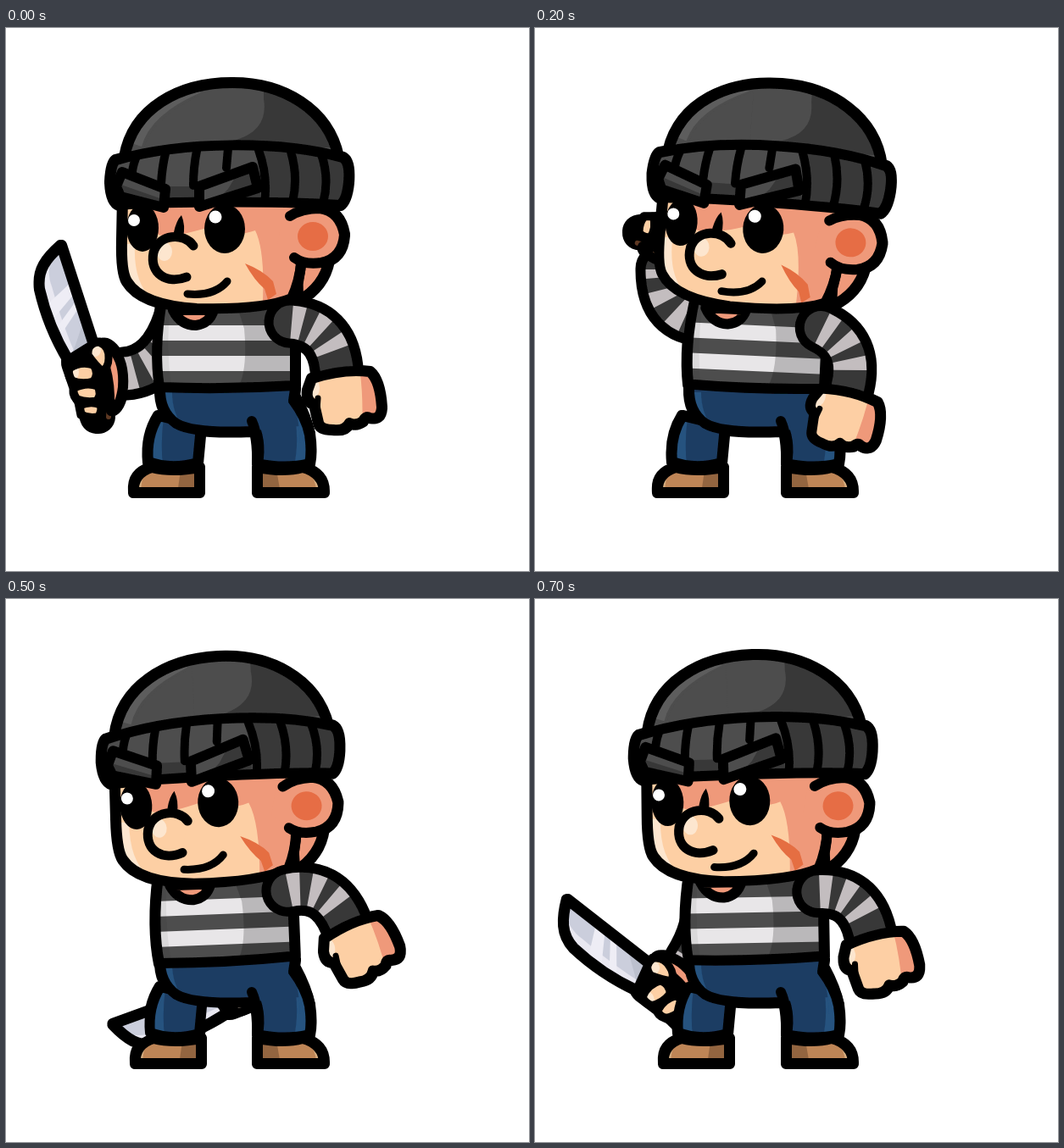
These frames come from a looping animation (617 by 641 pixels, 0.8 s). An HTML page:

```html
<!DOCTYPE html>
<html>
<head>
<meta charset="utf-8">
<style>
html, body { margin: 0; width: 100%; height: 100%; overflow: hidden; background: #fff; }
svg { display: block; }
</style>
</head>
<body>
<svg id="stage" width="617" height="641" viewBox="0 0 617 641" stroke-linecap="round" stroke-linejoin="round"></svg>
<script>
const stage = document.getElementById('stage');
const SKIN = '#fdcfa4', BLUSH = '#ef997a', PALE = '#fde6cf';
const GREY = '#4d4d4d', DARK = '#383838', LIGHT = '#c3bdbf';
let clips = 0;

const fill = (d, color) => `<path d="${d}" fill="${color}"/>`;
const line = (d, width = 10, color = '#000') =>
  `<path d="${d}" fill="none" stroke="${color}" stroke-width="${width}"/>`;
const oval = (x, y, rx, ry, color) =>
  `<ellipse cx="${x}" cy="${y}" rx="${rx}" ry="${ry}" fill="${color}"/>`;
const group = (id, content) => `<g id="${id}">${content}</g>`;

// Outlined shape whose shading is clipped to its own edge
function part(d, color, shading = '', width = 12) {
  const id = 'clip' + clips++;
  return `<clipPath id="${id}"><path d="${d}"/></clipPath>` + fill(d, color) +
    `<g clip-path="url(#${id})">${shading}</g>` + line(d, width);
}

const sleeve = (name, d, dash) =>
  `<path class="${name}" d="${d}" fill="none" stroke="#000" stroke-width="61"/>
   <path class="${name}" d="${d}" fill="none" stroke="${DARK}" stroke-width="39"/>
   <path class="${name}" d="${d}" fill="none" stroke="${LIGHT}" stroke-width="39"
     stroke-linecap="butt" stroke-dasharray="${dash}"/>`;

// Thin black rim around the whole silhouette
const rim = `<filter id="rim" x="0" y="0" width="617" height="641" filterUnits="userSpaceOnUse">
  <feMorphology in="SourceAlpha" operator="dilate" radius="1"/>
  <feMerge><feMergeNode/><feMergeNode in="SourceGraphic"/></feMerge></filter>`;

const knife =
  line('M86 394 L108 458', 40) +
  line('M122 446 L121 459', 6, '#5d3822') +
  part('M65 257 C48 272 37 286 40 308 Q50 352 74 392 L103 374 Z', '#cbcedc',
    fill('M58 255 Q46 285 54 305 Q66 350 84 390 L65 392 L34 310 Z', '#e9e8f1') +
    fill('M48 327 L78 299 L82 312 L56 343 Z M61 352 L85 319 L88 327 L66 360 Z', '#eeedf5') +
    fill('M90 350 L100 362 L108 380 L74 394 L82 374 Z', '#bcc0ce')) +
  part('M101 386 Q112 363 126 379 Q140 394 138 424 Q135 448 124 452 L117 405 Z', BLUSH) +
  part('M75 402 Q88 393 103 398 Q110 408 103 417 Q89 421 78 416 Q73 408 75 402 Z', SKIN,
    oval(79, 406, 7, 10, PALE), 9) +
  part('M81 425 Q95 418 108 423 Q113 432 107 440 Q94 442 84 438 Q78 430 81 425 Z', SKIN, '', 9) +
  part('M87 446 Q100 440 111 445 Q114 453 108 459 Q97 461 89 456 Z', SKIN, '', 9) +
  part('M97 386 Q96 372 110 371 Q122 376 121 390 Q121 400 114 405 Q106 399 97 386 Z', SKIN,
    oval(105, 380, 7, 8, PALE), 9) +
  line('M119 398 Q126 424 124 444', 7);

const leftLeg =
  part('M180 458 Q165 482 168 512 Q195 522 226 513 L230 470 Z', '#1e3d63',
    fill('M160 440 H190 Q180 480 186 525 H155 Z', '#25527f')) +
  part('M151 548 Q149 526 172 519 Q196 525 228 519 V548 Z', '#be8557',
    fill('M145 515 H168 Q159 530 159 550 H140 Z', '#d6ae80') +
    fill('M207 515 H235 V550 H202 Z', '#936541'));

const rightLeg =
  part('M288 440 L341 436 Q354 460 358 480 Q361 500 358 514 Q330 521 297 514 Q302 486 290 464 Z', '#1e3d63',
    fill('M334 430 H370 V525 H338 Q350 480 334 430 Z', '#25527f')) +
  part('M297 548 V519 Q328 525 350 519 Q375 526 375 548 Z', '#be8557',
    fill('M295 515 H318 L324 550 H295 Z', '#936541') +
    fill('M352 515 H380 V550 H367 Q365 530 352 515 Z', '#d6ae80'));

const hips =
  fill('M183 424 H341 L346 470 L295 475 L287 462 L290 476 Q250 482 213 474 Q180 464 183 424 Z', '#1e3d63') +
  fill('M187 430 H196 Q196 455 210 472 Q187 462 187 430 Z', '#25527f') +
  fill('M334 430 H341 Q354 460 354 480 L347 490 Q346 455 334 430 Z', '#25527f') +
  line('M182 425 Q181 453 201 467 Q222 479 289 476 M290 464 Q298 482 297 513', 12) +
  line('M341 426 L339 440 Q354 460 358 480', 12);

const stripes = [351, 387].map(y => fill(`M170 ${y} H350 v18 H170 Z`, '#e8e6e8')).join('');
const torso =
  part('M184 322 Q174 380 181 424 Q260 427 341 422 V322 Z', GREY,
    stripes +
    '<path d="M270 320 H350 V430 H270 Q286 410 281 355 Z" opacity=".2"/>' +
    '<path d="M170 320 H194 Q188 380 196 430 H170 Z" opacity=".06"/>') +
  part('M197 333 Q206 351 224 351 Q240 349 245 333 Z', BLUSH);

const ribs = 'M153 154 Q149 164 148 178 M188 148 Q184 165 183 184 M225 145 Q221 165 221 186 ' +
  'M262 142 L260 165 M298 144 Q309 175 305 205 M336 146 Q345 176 338 206 M372 149 Q382 178 374 207';

const head =
  part('M345 322 Q375 305 381 274 L344 268 Z', BLUSH) +
  part('M138 200 L137 250 Q136 288 143 299 Q160 327 225 331 Q304 333 337 319 Q346 300 349 274 L350 200 Z', SKIN,
    fill('M170 200 H355 V340 H302 Q307 265 294 239 Q270 248 240 235 Q190 250 178 243 Z', BLUSH) +
    fill('M135 255 H152 Q150 300 172 320 L140 315 Z', PALE) +
    fill('M282 278 Q303 286 315 299 L319 314 L309 321 L305 308 Q293 298 282 278 Z', '#e56e43')) +
  fill('M330 208 L347 214 Q372 205 389 220 Q408 242 395 264 Q380 284 340 271 L320 255 Z', BLUSH) +
  line('M335 222 Q349 213 370 213 Q394 216 399 244 Q397 272 372 277 Q352 280 340 271 M348 276 Q347 298 340 314', 12) +
  oval(362, 246, 18, 17, '#e66d45') +
  line('M264 200 Q330 205 345 205', 8) +
  oval(161, 236, 19, 28, '#000') + oval(258, 237, 24, 29, '#000') +
  oval(151, 227, 7, 7, '#fff') + oval(247, 223, 7.5, 7.5, '#fff') +
  fill('M198 241 Q201 227 207 221 Q212 233 209 247 Z', '#000') +
  fill('M221 257 C210 241 180 243 174 265 C169 290 190 303 213 294 Z', SKIN) +
  oval(187, 264, 9, 11, PALE) +
  line('M221 257 C210 241 180 243 174 265 C169 290 190 303 213 294', 11) +
  line('M214 314 Q246 317 261 299', 9) +
  part('M140 153 C150 95 205 65 267 65 C325 65 380 95 392 153 Z', GREY,
    fill('M160 140 Q170 102 230 76 L200 60 L130 130 Z', '#5d5d5d') +
    fill('M163 140 Q174 104 235 76 V145 Z', GREY) +
    fill('M304 60 V84 Q310 120 272 132 L230 141 H400 V60 Z', DARK)) +
  part('M130 156 C210 133 325 133 397 153 Q406 158 404 182 Q402 203 394 209 C350 205 200 204 134 209 Q124 205 123 182 Q124 160 130 156 Z', GREY,
    fill('M300 130 H410 V215 H305 Z', DARK) +
    fill('M180 187 H300 V212 H180 Z', DARK) + line(ribs)) +
  part('M137 170 L188 190 L186 212 L135 199 L130 187 Z', GREY,
    fill('M130 183 L190 204 V215 L130 205 Z', DARK)) +
  part('M228 187 L291 164 L297 189 L228 211 Z', GREY,
    fill('M280 160 H300 V195 L240 212 L262 190 Z', DARK));

const hand =
  part('M361 414 Q398 402 429 406 Q441 416 443 448 Q442 463 429 460 Q424 457 421 464 Q412 470 405 466 Q400 476 386 474 Q371 474 369 466 L364 444 Q354 441 356 428 Z', SKIN,
    fill('M416 395 H450 V475 H420 Q422 430 416 395 Z', BLUSH) + oval(361, 425, 9, 12, PALE)) +
  line('M368 437 L367 450', 7);

stage.innerHTML = rim + '<g filter="url(#rim)">' +
  sleeve('reach', '', '14 14') + group('knife', knife) +
  group('leg', leftLeg) + rightLeg + hips +
  group('torso', torso) + group('head', head) +
  group('arm', sleeve('swing', 'M335 347 Q384 350 390 402', '0 2 13 12 13 12 13 100') + hand) + '</g>';

// head angle, body drop, torso angle, front arm angle, leg shift, knife [x, y, angle], elbow, wrist
const poses = [
  [0, 0, 0, 0, 0, [105, 425, 0], [185, 405], [140, 408]],
  [2.4, 0, 1.6, 12, -4, [100, 335, 42], [155, 400], [130, 347]],
  [4.07, 0, 2.6, 21, -6, [157, 244, 100], [150, 345], [150, 285]],
  [.8, .5, .3, 4, -3, [106, 412, 11.5], [185, 402], [140, 398]],
  [-2.5, 2.7, -2, -16, 1, [298, 452, -95], [235, 385], [265, 410]],
  [-2.8, 2.8, -2.3, -16.5, 2, [293, 456, -92], [235, 385], [260, 410]],
  [-2.9, 2.7, -2.2, -15, 2.5, [243, 467, -73], [225, 385], [225, 420]],
  [-1.7, 1, -1, -7, 1, [165, 472, -34], [208, 390], [182, 430]]
];

const move = (id, value) => document.getElementById(id).setAttribute('transform', value);

function draw() {
  const step = Math.floor(performance.now() % 800 / 100);
  const [tilt, drop, lean, swing, shift, [x, y, turn], elbow, wrist] = poses[step];
  const body = `translate(0 ${drop}) rotate(${lean} 258 425)`;
  move('head', `translate(0 ${drop}) rotate(${tilt} 264 396)`);
  move('torso', body);
  move('arm', `${body} rotate(${swing - lean} 325 345)`);
  move('leg', `translate(${shift} 0)`);
  move('knife', `translate(${x} ${y}) rotate(${turn}) translate(-105 -425)`);
  for (const path of document.querySelectorAll('.reach'))
    path.setAttribute('d', `M205 345 Q${elbow} ${wrist}`);
  requestAnimationFrame(draw);
}
draw();
</script>
</body>
</html>
```
